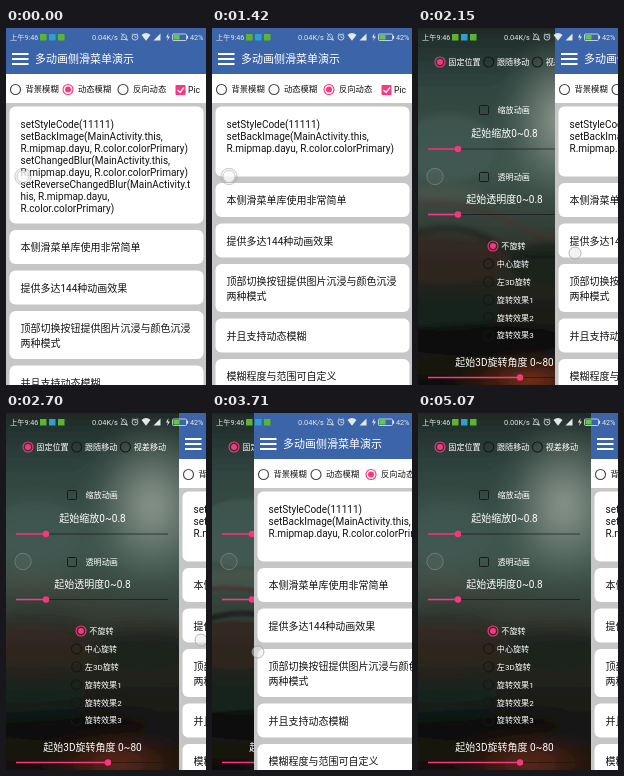
These frames come from a looping animation (200x357 px, 6.01 s). An HTML page:

```html
<!DOCTYPE html>
<html lang="zh-CN">
<head>
<meta charset="utf-8">
<title>侧滑菜单</title>
<style>
html, body { margin: 0; width: 100%; height: 100%; overflow: hidden; background: #111; }
svg { display: block; width: 100%; height: 100%; }
text { font-family: Roboto, "Noto Sans CJK SC", "Noto Sans CJK", sans-serif; white-space: pre; }
</style>
</head>
<body>
<svg id="stage" viewBox="0 0 200 357" preserveAspectRatio="none">
  <defs>
    <linearGradient id="dusk" x1="0" y1="0" x2="0" y2="1">
      <stop offset="0" stop-color="#1f2b28"/>
      <stop offset=".13" stop-color="#2f433e"/>
      <stop offset=".33" stop-color="#3d544c"/>
      <stop offset=".46" stop-color="#35423b"/>
      <stop offset=".57" stop-color="#292822"/>
      <stop offset=".7" stop-color="#1a1a17"/>
      <stop offset=".85" stop-color="#11100e"/>
      <stop offset="1" stop-color="#150e0a"/>
    </linearGradient>
    <radialGradient id="glow">
      <stop offset="0" stop-color="#a3aca3"/>
      <stop offset=".4" stop-color="#7f8c83" stop-opacity=".75"/>
      <stop offset="1" stop-color="#4d645b" stop-opacity="0"/>
    </radialGradient>
    <radialGradient id="ember">
      <stop offset="0" stop-color="#7a3115"/>
      <stop offset="1" stop-color="#4a1f10" stop-opacity="0"/>
    </radialGradient>
    <filter id="soft" filterUnits="userSpaceOnUse" x="-60" y="-60" width="320" height="480">
      <feGaussianBlur id="blur" stdDeviation="2"/>
    </filter>
    <clipPath id="frame"><rect width="200" height="357"/></clipPath>
  </defs>
  <g clip-path="url(#frame)">
    <g id="scene" filter="url(#soft)"></g>
    <g id="menu"></g>
    <g id="page"></g>
    <g id="overlay"></g>
  </g>
</svg>
<script>
const NS = 'http://www.w3.org/2000/svg';
const PINK = '#f9367f', BLUE = '#3c64a8', LOOP = 6010;
const byId = id => document.getElementById(id);

function add(parent, tag, attrs = {}, content) {
  const el = document.createElementNS(NS, tag);
  for (const key in attrs) el.setAttribute(key, attrs[key]);
  if (content !== undefined) el.textContent = content;
  parent.appendChild(el);
  return el;
}
const rect = (p, x, y, width, height, fill, more) => add(p, 'rect', { x, y, width, height, fill, ...more });
const circle = (p, cx, cy, r, fill, more) => add(p, 'circle', { cx, cy, r, fill, ...more });
const path = (p, d, stroke, width = 1, more) =>
  add(p, 'path', { d, stroke, 'stroke-width': width, fill: 'none', ...more });
// y is the middle of the line
const label = (p, x, y, size, fill, str, more) =>
  add(p, 'text', { x, y: y + size * 0.36, 'font-size': size, fill, ...more }, str);

function radio(p, x, y, idle) {
  const ring = circle(p, x, y, 5, 'none', { 'stroke-width': 1.1 });
  const dot = circle(p, x, y, 3, PINK);
  return level => {
    ring.setAttribute('stroke', level > 0 ? PINK : idle);
    dot.setAttribute('r', 3 * level);
  };
}

// Backdrop
const scene = byId('scene');
rect(scene, -60, -60, 320, 480, '#1a1f1c');
rect(scene, -60, 0, 320, 420, 'url(#dusk)');
[
  [146, 92, 72, 92, 'url(#glow)', .85], [30, 120, 48, 34, '#46615a', .4],
  [22, 166, 44, 10, '#4b584f', .6], [25, 232, 62, 24, '#33251d', .7],
  [140, 235, 50, 22, '#1b211e', .7], [30, 282, 50, 20, '#182522', .7],
  [60, 312, 90, 16, '#0e0d0c', .7], [112, 352, 80, 30, 'url(#ember)', 1]
].forEach(([cx, cy, rx, ry, fill, opacity]) => add(scene, 'ellipse', { cx, cy, rx, ry, fill, opacity }));
path(scene, 'M-10 176Q50 170 96 196T190 204', '#4a2f25', 4, { opacity: .7 });
path(scene, 'M-10 208Q40 190 74 214T180 222', '#161411', 6, { opacity: .6 });

// Side menu
const menu = byId('menu');
function menuRadio(x, y, str, on) {
  radio(menu, x, y, '#141816')(on ? 1 : 0);
  label(menu, x + 8.3, y, 8.1, '#fff', str);
}
function menuCheck(y, str) {
  rect(menu, 61.5, y - 4.5, 9, 9, 'none', { stroke: '#151918', rx: 1 });
  label(menu, 79.5, y, 8.1, '#fff', str);
}
function slider(y, str, value) {
  label(menu, 86.5, y - 15.5, 10, '#fff', str, { 'text-anchor': 'middle' });
  path(menu, `M10 ${y}H162`, '#171717', 1, { opacity: .7 });
  path(menu, `M10 ${y}H${value}`, PINK, 1.6);
  circle(menu, value, y, 3.2, PINK);
}
['固定位置', '跟随移动', '视差移动'].forEach((s, i) => menuRadio(22 + i * 48.7, 34, s, i === 0));
menuCheck(82, '缩放动画');
slider(121, '起始缩放0~0.8', 40);
menuCheck(149, '透明动画');
slider(186.5, '起始透明度0~0.8', 40);
['不旋转', '中心旋转', '左3D旋转', '旋转效果1', '旋转效果2', '旋转效果3']
  .forEach((s, i) => menuRadio(i ? 70.5 : 75, 218 + i * 17.9, s, i === 0));
slider(349.5, '起始3D旋转角度 0~80', 102);

// Main page
const page = byId('page');
rect(page, 0, 0, 200, 357, '#c6c6c6');
rect(page, 0, 0, 200, 46, BLUE);
[26, 31, 36].forEach(y => rect(page, 6, y - 1, 16.5, 2, '#fff'));
label(page, 29, 31, 11, '#fff', '多动画侧滑菜单演示');
rect(page, 0, 46, 200, 29, '#fff');
const modes = [[9.5, '背景模糊'], [62, '动态模糊'], [117, '反向动态']].map(([x, s]) => {
  label(page, x + 10, 61.5, 8.3, '#111', s);
  return radio(page, x, 61.5, '#444');
});
rect(page, 169.5, 57, 10, 10, PINK, { rx: 1 });
path(page, 'M171.5 62L174 64.5L178 59.5', '#fff', 1.3);
label(page, 182, 62, 8.6, '#111', 'Pic');

function card(p, y, height, lines, top, step) {
  rect(p, 3.5, y, 194, height, '#fff', { rx: 6 });
  return lines.map((s, i) => label(p, 14.5, top + i * step, 10, '#111', s));
}
const codeLines = [
  'setStyleCode(11111)',
  'setBackImage(MainActivity.this,',
  'R.mipmap.dayu, R.color.colorPrimary)',
  'setChangedBlur(MainActivity.this,',
  'R.mipmap.dayu, R.color.colorPrimary)',
  'setReverseChangedBlur(MainActivity.t',
  'his, R.mipmap.dayu,',
  'R.color.colorPrimary)'
];
const codeCard = add(page, 'g');
const codeText = card(codeCard, 78.5, 117, codeLines, 96.5, 12);
const cards = add(page, 'g');
[
  [155, 34, ['本侧滑菜单库使用非常简单']],
  [195.5, 34, ['提供多达144种动画效果']],
  [236, 48, ['顶部切换按钮提供图片沉浸与颜色沉浸', '两种模式']],
  [290.5, 34, ['并且支持动态模糊']],
  [331, 34, ['模糊程度与范围可自定义']]
].forEach(([y, h, lines]) => card(cards, y, h, lines, y + 17.5, 14.5));

// Status bar
const overlay = byId('overlay');
const LIGHT = '#e4e8ea';
label(overlay, 4, 9, 7.2, LIGHT, '上午9:46');
['#5cb531', '#2f9fd0', '#5cb531'].forEach((c, i) => rect(overlay, 34 + i * 9, 6, 6.5, 6.5, c));
const speed = label(overlay, 86, 9, 7.4, LIGHT, '');
path(overlay, 'M115 11.5H121.4L120.4 10V8Q118.2 4 116 8V10ZM115 5L121.5 13', LIGHT, .7);
circle(overlay, 129, 9.2, 2.9, 'none', { stroke: LIGHT, 'stroke-width': .8 });
path(overlay, 'M129 7.5V9.5H130.5M125.8 6.8L127.3 5.4M130.7 5.4L132.2 6.8', LIGHT, .7);
path(overlay, 'M135.5 7Q140 3 144.5 7L140 12.8Z', 'none', 0, { fill: LIGHT });
path(overlay, 'M147.5 12.5H154.5V5.5Z', 'none', 0, { fill: LIGHT });
path(overlay, 'M162.5 5L160 9.5H162L161 13L164 8.5H162Z', 'none', 0, { fill: LIGHT });
rect(overlay, 166.5, 6, 14, 6.5, 'none', { stroke: LIGHT, 'stroke-width': .8, rx: 1 });
rect(overlay, 167.5, 7, 6, 4.5, '#56cf45');
rect(overlay, 181, 7.7, 1.1, 3, LIGHT);
label(overlay, 184, 9, 7.2, LIGHT, '42%');

// Floating button and finger
circle(overlay, 17, 148.5, 8.2, '#999', { 'fill-opacity': .1, stroke: '#999', 'stroke-opacity': .5, 'stroke-width': 1 });
const knob = circle(overlay, 17, 148.5, 6, '#fff', { stroke: '#aaa', 'stroke-width': .7 });
const finger = circle(overlay, 0, 0, 6, '#e8e8e8', { 'fill-opacity': .5, stroke: '#999', 'stroke-opacity': .65, 'stroke-width': 1 });

// Each step: time, page offset, finger x, finger y
const steps = [
  [0, 0], [1730, 8, 27, 224], [1880, 48, 67, 224], [2030, 96, 115, 225],
  [2150, 137, 157, 225], [2300, 163, 182, 226], [2430, 171, 191, 226],
  [2580, 173, 194, 227], [2700, 173, 195, 227], [2850, 154, 168, 232],
  [3000, 108, 115, 238], [3120, 65, 65, 243], [3270, 29, 25, 247],
  [3430, 9, 8, 246], [3580, 12, 14, 243], [3710, 42, 46, 239],
  [3860, 82, 88, 235], [4010, 119, 126, 232], [4130, 147, 154, 230],
  [4280, 163, 171, 229], [4400, 170, 180, 228], [4550, 173, 188, 228],
  [4670, 173, 192, 228], [5070, 173]
];

function draw(t) {
  const [, offset, fx, fy] = steps.findLast(s => s[0] <= t);
  const open = offset / 173;
  page.setAttribute('transform', `translate(${offset} 0)`);
  byId('blur').setAttribute('stdDeviation', 1 + 9 * open ** 6);
  for (const layer of [scene, menu]) layer.style.display = offset ? '' : 'none';

  const shift = t < 280 ? 0 : t < 400 ? .5 : 1;
  [0, 1 - shift, shift].forEach((level, i) => modes[i](level));

  const short = t >= 1000;
  codeCard.firstChild.setAttribute('height', short ? 70 : 117);
  codeText.forEach((line, i) => line.style.display = short && i > 2 ? 'none' : '');
  cards.setAttribute('transform', `translate(0 ${short ? 0 : 47})`);

  speed.textContent = t < 3860 ? '0.04K/s' : '0.00K/s';
  knob.setAttribute('opacity', offset > 17 ? 0 : .75);
  finger.style.display = fx === undefined ? 'none' : '';
  if (fx !== undefined) {
    finger.setAttribute('cx', fx);
    finger.setAttribute('cy', fy);
  }
}

const start = performance.now();
function tick() {
  draw((performance.now() - start) % LOOP);
  requestAnimationFrame(tick);
}
tick();
</script>
</body>
</html>
```
